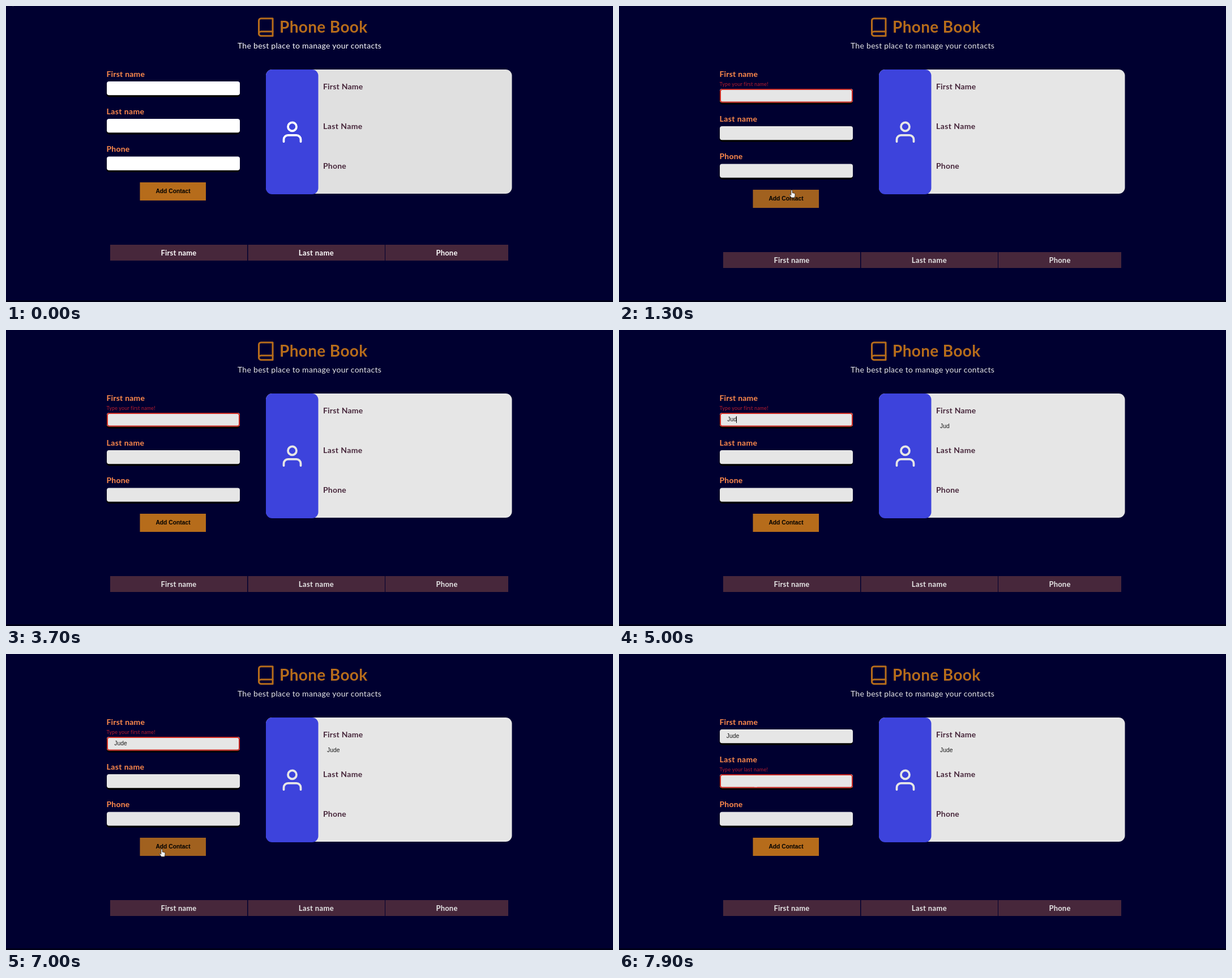
Animation, 1072 px wide and 522 px high, one loop 8 s. Source, as an HTML page:

```html
<!DOCTYPE html>
<html lang="en">
<head>
<meta charset="utf-8">
<title>Phone Book</title>
<style>
  html, body { margin: 0; width: 100%; height: 100%; overflow: hidden; background: #000030; }
  svg { display: block; width: 1072px; height: 522px; --light: #fff; --card: #e0e0e0; }
  text { font-family: Lato, "Open Sans", sans-serif; white-space: pre; }
  .title { font-size: 28px; font-weight: 700; letter-spacing: .35px; fill: #b66c1b; }
  .sub { font-size: 14px; letter-spacing: .29px; fill: var(--light); }
  .label { font-size: 14px; font-weight: 700; letter-spacing: .2px; fill: #ff8a4c; }
  .dark { fill: #47273b; }
  .head { font-size: 13px; font-weight: 700; letter-spacing: .2px; fill: var(--light); }
  .wide { letter-spacing: .4px; }
  .error { font-size: 9px; letter-spacing: .15px; fill: #b81c2e; }
  .value { font: 10.4px "Liberation Sans", Arial, sans-serif; fill: #1a1a1a; }
  .btn { font: bold 10.3px "Liberation Sans", Arial, sans-serif; fill: #000; }
  .mid { text-anchor: middle; }
  .light { fill: var(--light); }
  .line { fill: none; stroke-width: 2; stroke-linecap: round; stroke-linejoin: round; }
</style>
</head>
<body>
<svg id="stage" viewBox="0 0 1072 522">
  <rect width="1072" height="522" fill="#000030"/>
  <rect y="519" width="1072" height="3" fill="#000018"/>

  <g class="line" stroke="#b66c1b" transform="translate(440.4 19) scale(1.53)">
    <path d="M4 19.5A2.5 2.5 0 0 1 6.5 17H20"/>
    <path d="M6.5 2H20v20H6.5A2.5 2.5 0 0 1 4 19.5v-15A2.5 2.5 0 0 1 6.5 2z"/>
  </g>
  <text class="title" x="483" y="47">Phone Book</text>
  <text class="sub mid" x="536" y="75">The best place to manage your contacts</text>

  <rect x="459" y="112" width="434.5" height="219" rx="11" style="fill:var(--card)"/>
  <rect x="459" y="112" width="92.5" height="220" rx="11" fill="#3d43dc"/>
  <g class="line" style="stroke:var(--light)" transform="translate(483 199.75) scale(1.875)">
    <path d="M20 21v-2a4 4 0 0 0-4-4H8a4 4 0 0 0-4 4v2"/>
    <circle cx="12" cy="7" r="4"/>
  </g>
  <text class="label dark" x="560" y="147">First Name</text>
  <text class="label dark wide" x="560" y="217">Last Name</text>
  <text class="label dark" x="560" y="287">Phone</text>
  <text class="value" id="cardName" x="567" y="173"></text>

  <g id="fields"></g>

  <g id="lower">
    <rect id="button" x="236.5" y="311" width="116.5" height="32"/>
    <text class="btn mid" x="295" y="330">Add Contact</text>
    <g fill="#47273b">
      <rect x="184" y="421" width="242" height="28"/>
      <rect x="427.5" y="421" width="241.5" height="28"/>
      <rect x="670" y="421" width="217" height="28"/>
    </g>
    <text class="head mid" x="305" y="440">First name</text>
    <text class="head wide mid" x="548" y="440">Last name</text>
    <text class="head mid" x="778.5" y="440">Phone</text>
  </g>

  <text class="value" id="typed"></text>
  <rect id="caret" y="152" width="1" height="12" fill="#111"/>

  <g id="arrow"><path d="M0 0V10.2L2.5 8L4 11.6L5.7 10.9L4.2 7.4H7.2Z" fill="#f0f0f0" stroke="#111" stroke-width=".5"/></g>
  <g id="hand"><path d="M-1.2 1q0-1 1.2-1q1.2 0 1.2 1V5l3.6.8q1.2.3 1.2 1.6V10L5 13.5H-.5L-4 8.8q-.3-1.2.8-1.2L-1.2 9z" fill="#f4f4f4" stroke="#111" stroke-width=".7"/></g>
  <g id="beam"><path class="light" d="M-2.5-7h5v1h-2v12.5h2v1h-5v-1h2v-12.5h-2z"/></g>
</svg>
<script>
const LOOP = 8000, SHIFT = 13, NAME = "Jude", EM = 10.4;
const $ = id => document.getElementById(id);

const fieldDefs = [
  { label: "First name", y: 133, msg: "Type your first name!" },
  { label: "Last name", y: 199, msg: "Type your last name!", wide: " wide" },
  { label: "Phone", y: 265.5, msg: "" }
];

// Each row holds until the next one: time, then value(s).
const errorSteps = [[0, -1], [1300, 0], [7300, 1]];
const typeSteps = [[0, 0], [4300, 1], [4500, 2], [5000, 3], [5200, 4]];
const caretSteps = [[0, 0], [2200, 1], [2700, 0], [3200, 1], [3700, 0],
  [4200, 1], [5800, 0], [6300, 1], [6800, 0]];
const pointerSteps = [
  [0, 8, -11], [200, 60, 12], [300, 140, 60], [400, 235, 110], [500, 330, 165],
  [600, 390, 215], [700, 398, 260], [800, 350, 300], [900, 305, 324.5],
  [1800, 300, 259], [1900, 297, 224],
  [6300, 236, 180], [6400, 237, 184], [6500, 239, 199], [6600, 243, 223],
  [6700, 250, 251], [6800, 259, 290], [6900, 268, 328], [7000, 275, 344],
  [7800, 255, 290], [7900, 241.5, 227]
];

$("fields").innerHTML = fieldDefs.map((f, i) => `
  <text class="label${f.wide || ""}" id="label${i}" x="177.5" y="${f.y - 8.5}">${f.label}</text>
  <text class="error${i ? "\" style=\"letter-spacing:.22px" : ""}" id="msg${i}" x="177.5" y="${f.y + 8}">${f.msg}</text>
  <g id="input${i}">
    <rect x="177.5" y="${f.y + 1}" width="235.5" height="26.5" rx="5" fill="#000"/>
    <rect class="light" x="178" y="${f.y}" width="235" height="24.2" rx="4"/>
    <rect id="ring${i}" x="179" y="${f.y + 1}" width="233" height="22.6" rx="3.5"
      fill="none" stroke="#cc2a22" stroke-width="2"/>
  </g>`).join("");

function at(steps, t) {
  let row = steps[0];
  for (const s of steps) if (s[0] <= t) row = s;
  return row.slice(1);
}

const show = (el, on) => el.setAttribute("visibility", on ? "visible" : "hidden");
const move = (el, x, y) => el.setAttribute("transform", `translate(${x} ${y})`);

function drawPointer(t, inputTops, drop) {
  const [x, y] = at(pointerSteps, t);
  const onButton = x > 236 && x < 353 && y >= 311 + drop && y <= 343 + drop;
  const onInput = x > 178 && x < 413 && inputTops.some(top => y >= top && y <= top + 24.5);
  const kind = onButton ? "hand" : onInput ? "beam" : "arrow";
  for (const id of ["arrow", "hand", "beam"]) {
    show($(id), id === kind);
    move($(id), x, y);
  }
  $("button").setAttribute("fill", onButton ? "#a1611f" : "#b66c1b");
}

function render(t) {
  const [err] = at(errorSteps, t);
  const failed = err >= 0;
  $("stage").style.setProperty("--light", failed ? "#e6e6e6" : "#fff");
  $("stage").style.setProperty("--card", failed ? "#e6e6e6" : "#e0e0e0");

  const tops = fieldDefs.map((f, i) => {
    const labelDrop = failed && i > err ? SHIFT : 0;
    const inputDrop = failed && i >= err ? SHIFT : 0;
    move($("label" + i), 0, labelDrop);
    move($("input" + i), 0, inputDrop);
    show($("msg" + i), i === err);
    show($("ring" + i), i === err);
    return f.y + inputDrop;
  });
  const drop = failed ? SHIFT : 0;
  move($("lower"), 0, drop);

  const [count] = at(typeSteps, t);
  const word = NAME.slice(0, count);
  $("typed").textContent = $("cardName").textContent = word;
  $("typed").setAttribute("x", err === 1 ? 189.7 : 191.2);
  $("typed").setAttribute("y", tops[0] + 15);
  $("caret").setAttribute("x", Math.floor(191 + (count ? count * .556 - .056 : 0) * EM));
  show($("caret"), at(caretSteps, t)[0]);

  drawPointer(t, tops, drop);
}

const start = performance.now();
function tick(now) {
  render(Math.max(0, now - start) % LOOP);
  requestAnimationFrame(tick);
}
render(0);
requestAnimationFrame(tick);
</script>
</body>
</html>
```
